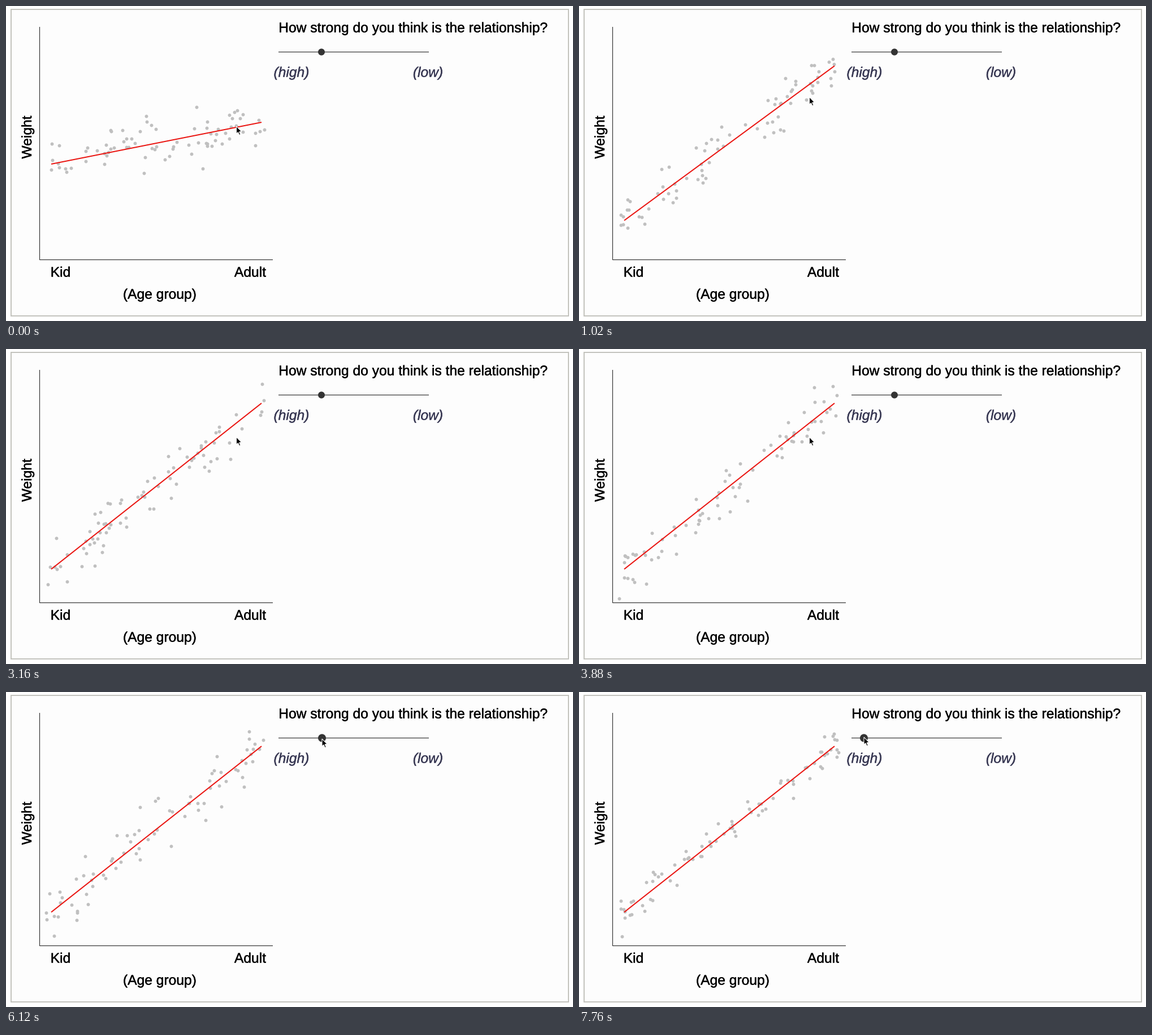
A matplotlib script that plays this animation: 1003x558 px, repeating every 7.78 s.

```python
import math

import matplotlib.patheffects as pe
import matplotlib.pyplot as plt
import numpy as np
from matplotlib.animation import FuncAnimation
from matplotlib.patches import Circle, Polygon, Rectangle

W, H, DPI = 1003, 558, 64
LOOP, STEP = 7780, 20
PT = 72 / DPI  # points per pixel

plt.rcParams["font.family"] = "Liberation Sans"
plt.rcParams["text.hinting"] = "none"

INK = "#333333"
LEFT, RIGHT, MID_X, MID_Y = 80, 452, 266, 243
TRACK_L, TRACK_R, TRACK_Y = 482, 748, 81.5
KNOB_X = 558
HOVER_FROM = 4880

N_POINTS = 77
DRAW_MS = 640
rng = np.random.default_rng(12)
draws = rng.standard_normal((LOOP // DRAW_MS + 2, 2, N_POINTS)).clip(-2.6, 2.6)
phi = np.vectorize(lambda z: 0.5 * (1 + math.erf(z / math.sqrt(2))))


def ease(t, start, end):
    u = min(max((t - start) / (end - start), 0), 1)
    return u * u * (3 - 2 * u)


def pose(t):
    """Line tilt, cursor tip and knob position at time t."""
    drag = ease(t, 150, 1220)
    travel = ease(t, 4060, 4620)
    settle = ease(t, 4700, 4960)
    slide = ease(t, 6200, 7400)
    tilt = 37 + 110 * drag
    cx = 407.5 + 143 * travel + 8.5 * settle - 55 * slide
    cy = 213 - 57 * drag - 59 * travel - 14 * settle - 3 * slide
    hover = t >= HOVER_FROM
    return tilt, cx, cy, cx if hover else KNOB_X, hover


def sample(t, tilt, spread):
    """Point cloud drifting from one random draw to the next."""
    k, u = divmod(t / DRAW_MS, 1)
    a = u * math.pi / 2
    zx, zy = draws[int(k)] * math.cos(a) + draws[int(k) + 1] * math.sin(a)
    x = 70 + 392 * phi(zx)
    y = MID_Y - tilt * (x - MID_X) / (RIGHT - MID_X) + spread * zy
    return np.column_stack([x, np.minimum(y, 446)])


fig = plt.figure(figsize=(W / DPI, H / DPI), dpi=DPI, facecolor="white")
ax = fig.add_axes([0, 0, 1, 1])
ax.set(xlim=(0, W), ylim=(H, 0))
ax.axis("off")


def stroke(xs, ys, color=INK, width=1.2, z=2):
    return ax.plot(xs, ys, color=color, lw=width * PT, zorder=z, snap=False,
                   solid_capstyle="butt", solid_joinstyle="miter")[0]


def label(x, y, text, color="black", **kw):
    # a hairline outline gives the slightly heavier letter weight
    bold = [pe.withStroke(linewidth=0.4 * PT, foreground=color)]
    ax.text(x, y, text, color=color, fontsize=24.6 * PT, ha="center",
            va="baseline", path_effects=bold, **kw)


ax.add_patch(Rectangle((9, 6), 986, 543, fc="#fdfdfd", ec="#c3c3bd",
                       lw=2 * PT, zorder=0))
stroke([59.5, 59.5, 472], [37, 449.5, 449.5])
stroke([TRACK_L, TRACK_R], [TRACK_Y, TRACK_Y])

label(720.5, 46.5, "How strong do you think is the relationship?")
label(96.5, 479.5, "Kid")
label(432, 479.5, "Adult")
label(272, 518.5, "(Age group)")
label(45, 232.5, "Weight", rotation=90, rotation_mode="anchor")
for x, text in ((505, "(high)"), (746.5, "(low)")):
    label(x, 125.5, text, "#3a3a55", style="italic")

dots = ax.scatter([0] * N_POINTS, [0] * N_POINTS, s=(5.9 * PT) ** 2,
                  c="#c0c0c0", linewidths=0, zorder=3)
fit = stroke([LEFT, RIGHT], [0, 0], "#ea1410", 2, 4)
knob = ax.add_patch(Circle((KNOB_X, TRACK_Y), 6, fc=INK, lw=0, zorder=5))
ARROW = np.array([(0, 0), (0, 13.2), (3, 10.6), (5.2, 15.6), (7.4, 14.6),
                  (5.2, 9.8), (9.2, 9.4)])
arrow = ax.add_patch(Polygon(ARROW, fc="black", ec="white", lw=1.1 * PT,
                             joinstyle="miter", zorder=6))


def update(i):
    t = i * STEP
    tilt, cx, cy, kx, hover = pose(t)
    spread = 12 + 40 * (kx - TRACK_L) / (TRACK_R - TRACK_L)
    dots.set_offsets(sample(t, tilt, spread))
    fit.set_ydata([MID_Y + tilt, MID_Y - tilt])
    knob.set_center((kx, TRACK_Y))
    knob.set_radius(7 if hover else 6)
    arrow.set_xy(ARROW + (cx, cy))
    return dots, fit, knob, arrow


anim = FuncAnimation(fig, update, frames=LOOP // STEP, interval=STEP,
                     init_func=lambda: update(0), repeat=True,
                     repeat_delay=0, blit=True)
plt.show()
```
